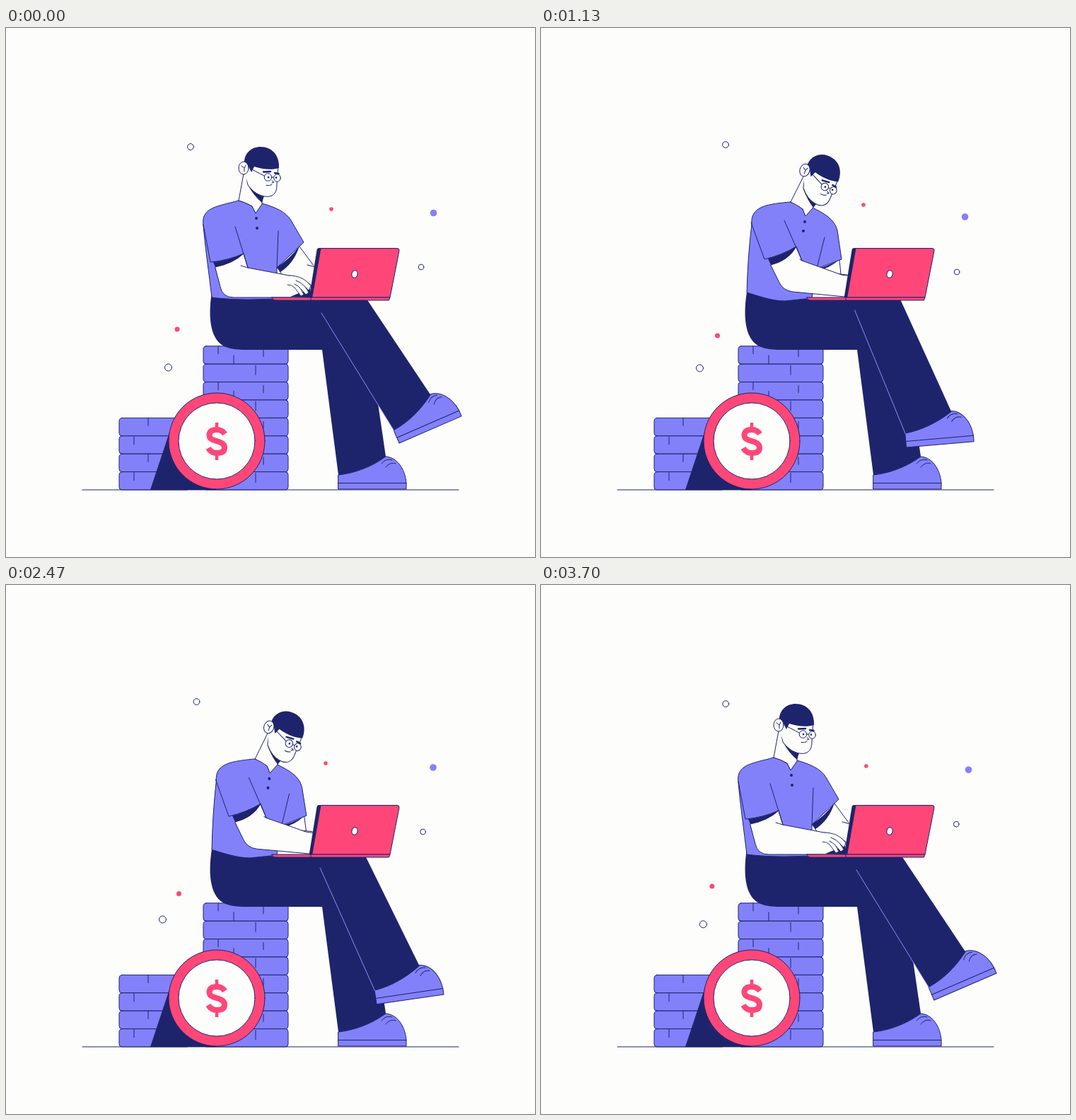
Recreate the animation shown at these times as an HTML page. Size 748 by 748 pixels, loop 3730 ms.

```html
<!DOCTYPE html>
<html lang="en">
<head>
<meta charset="utf-8">
<title>Working on a stack of coins</title>
<style>
  :root { --navy: #1e246c; --blue: #8281fa; --pink: #fe4778; --paper: #fdfdfc; }
  html, body { margin: 0; width: 100%; height: 100%; overflow: hidden; background: var(--paper); }
  svg { display: block; width: 100vw; height: 100vh; }
  svg * { stroke-linejoin: round; stroke-linecap: round; }
  .line { fill: none; stroke: var(--navy); }
  .navy { fill: var(--navy); }
  .blue { fill: var(--blue); stroke: var(--navy); }
  .pink { fill: var(--pink); stroke: var(--navy); }
  .paper { fill: var(--paper); stroke: var(--navy); }
  .skin { fill: var(--paper); }
  .sign { fill: none; stroke: var(--pink); stroke-linecap: butt; }
</style>
</head>
<body>
<svg viewBox="0 0 748 748">
  <defs>
    <g id="shoe">
      <path class="blue" d="M0 0H96V-9C94 -30 82 -45 67 -46C45 -30 20 -22 0 -20Z"/>
      <path class="line" d="M0 -8.5H96M61 -36C65 -41 70 -43 76 -41M67 -31C71 -36 76 -38 81 -36"/>
    </g>
  </defs>

  <path class="line" d="M108 653H640"/>
  <g id="stacks"></g>
  <path class="navy" d="M233 566L204 653H298L290 570Z"/>
  <circle class="pink" cx="298" cy="584" r="68"/>
  <circle class="paper" cx="298" cy="584" r="54"/>
  <path class="sign" stroke-width="8"
    d="M309.500 574C306.500 569.500 303 568 298 568C291 568 287.500 571 287.500 575.500C287.500 581 292 582.500 298 584.200C305 586 309 588.500 309 593.500C309 599 304.500 601 298 601C292.500 601 289 599 286 594"/>
  <path class="sign" stroke-width="4.5" d="M298 558V567M298 602V611"/>

  <use href="#shoe" x="470" y="652"/>
  <path class="navy" d="M291 373C287 400 287 425 298 441C308 455 326 455 345 455H447L470 632C490 630 515 622 537 606L526 531L518 480L472 384H383Z"/>
  <g id="foot"><use href="#shoe" transform="translate(556 587) rotate(-23.4)"/></g>
  <path id="leg" class="navy"/>
  <path id="seam" fill="none" stroke="#8e8df5"/>

  <!-- upper body: d is upright, data-to is leaning in -->
  <path class="blue"
    d="M329 244C315 248 297 251 288 257C279 263 278 270 279 280C282 313 287 347 291 381C305 383 330 384 345 384L383 383L383 339L421 303L403 272C396 260 380 253 362 248L353 262L348 252Q338 246 329 244Z"
    data-to="M353 246C340 247 322 249 313 253C301 258 297 266 298 277C294 310 292 340 291 374C305 378 325 386 345 386L383 382L388 341L425 327L419 286C415 270 400 262 384 254L374 266L370 256Q362 248 353 246Z"/>
  <path class="skin" d="M336 203L329 244Q340 247 348 252L353 262L362 249L364 232Z"
    data-to="M372 208L353 246Q362 250 370 256L374 266L384 255L391 240Z"/>
  <path class="line" d="M336 206L329 244Q340 247 348 252L353 262L362 249L362 238"
    data-to="M371 210L353 246Q362 250 370 256L374 266L384 255L387 248"/>
  <path class="navy" d="M342 222Q352 234 365 237L362 247Q350 237 342 222Z"
    data-to="M370 226Q378 242 390 248L385 254Q377 244 370 226Z"/>
  <path class="line" stroke-width="4" d="M354 269L354 269.1M355 283L355 283.1"
    data-to="M373 274L373 274.1M371 287L371 287.1"/>

  <path class="line" d="M385 287L383 340M415 309L435 336M384 339L391 350M426 335L437 338"
    data-to="M401 296L390 340M422 328L424 348M388 341L391 343M412 347L433 349"/>
  <path class="navy" d="M415 308Q402 326 383 338L388 345Q407 333 415 308Z"
    data-to="M421 328Q405 337 388 341L392 342Q408 340 421 328Z"/>

  <path class="paper"
    d="M296 338Q321 333 336 319L342 339L400 350C412 351 420 354 432 364L432 381L322 381Q306 381 303 366Z"
    data-to="M325 335Q350 329 361 309L369 329L425 349C430 350 434 350 440 351L440 381L356 373Q342 371 337 360Z"/>
  <path class="navy" d="M293 331Q313 329 336 319Q321 333 296 338Z"
    data-to="M321 326Q341 321 361 309Q350 329 325 335Z"/>
  <path class="line" d="M279 278L289 331Q313 329 336 319M324 281L342 339M332 336L342 339"
    data-to="M297 275L316 327Q341 321 361 309M344 272L369 329M366 327L369 329"/>
  <g id="hand">
    <path class="navy" d="M402 380L414 375L430 369V381Z"/>
    <path class="paper" stroke-width=".9" d="M400 350C414 350 424 355 431 365L428 371L423 366L428 374L424 377L417 369L421 377L417 379L408 367Q404 363 398 363"/>
    <path class="line" d="M410 357Q418 360 423 366M408 362Q413 364 417 369"/>
  </g>

  <path class="pink" d="M446 311.500H553Q556.500 311.500 556 315L543 381H431L442 314Q443 311.500 446 311.500Z"/>
  <path class="navy" d="M443 311Q440 311 439.500 314L428.500 382H433L445.500 311.500Z"/>
  <path class="pink" d="M376 381H543L541.500 385H382Q377 385 376 381Z"/>
  <path class="line" d="M431 381V385"/>
  <ellipse class="paper" cx="493" cy="348" rx="4" ry="5.3" transform="rotate(12 493 348)"/>

  <g id="head">
    <path class="paper" d="M343 195L340 212L342 222C348 230 355 236 365 238C377 240 383 234 383 222L385 192Z"/>
    <path class="skin" d="M336 197H347L343 221L337 207Z"/>
    <path class="navy" d="M337 190C337 177 347 168 360 168C376 168 387 180 386 198C376 201 363 200 351 196L347 204L343 196Z"/>
    <ellipse class="paper" cx="336" cy="198" rx="7" ry="9"/>
    <path class="line" d="M333 195L337 198L339 194M337 198V203"/>
    <path class="line" d="M346 199L365 209M375.500 211H378M376 216L379 218L376 219M368 222.500Q373 223.500 376 221.500"/>
    <circle class="paper" cx="370.5" cy="211" r="5.3"/>
    <ellipse class="paper" cx="383.5" cy="212" rx="4.8" ry="5.3"/>
    <path class="line" stroke-width="2.4" d="M364 203.500L374 203M380 205L385.500 206"/>
    <path class="line" stroke-width="2.6" d="M371 211V211.100M382 211.500V211.600"/>
  </g>
  <g id="dots"></g>
</svg>

<script>
const LOOP = 3730;
const $ = id => document.getElementById(id);
const lerp = (a, b, p) => a + (b - a) * p;
const ease = (t, from, to) => {
  const u = Math.min(1, Math.max(0, (t - from) / (to - from)));
  return u * u * (3 - 2 * u);
};

function add(parent, tag, attrs) {
  const el = document.createElementNS('http://www.w3.org/2000/svg', tag);
  for (const k in attrs) el.setAttribute(k, attrs[k]);
  return parent.appendChild(el);
}

// coin stacks
const ROW = 25.4;
function stack(x, w, rows, notches) {
  for (let i = 0; i < rows; i++) {
    const y = 653 - (rows - i) * ROW;
    add($('stacks'), 'rect', { class: 'blue', x, y, width: w, height: ROW, rx: 4 });
    const d = notches[i % 2].map(([nx, from, to]) => `M${nx} ${y + from}V${y + to}`).join('');
    add($('stacks'), 'path', { class: 'line', d });
  }
}
stack(160, 100, 4, [[[201, 0, 11]], [[181, 1, 12]]]);
stack(279, 120, 8, [[[300, 0, 11], [322, 13, 25], [364, 5, 15]], [[353, 2, 15]]]);

// drifting dots: radius, fill, then x,y at each time stop
const STOPS = [0, 370, 1130, 1930, 2470, 2930];
const dots = [
  [4.4, '', 261, 168, 258, 167, 261, 165, 266, 164, 269.5, 165, 270, 168],
  [2.8, '#fe4b68', 460, 256, 461, 255, 456, 250, 449.5, 247, 452, 252, 455, 256],
  [4.8, '#8281fa', 604.5, 261.5, 604, 265.5, 599.5, 267, 603, 264, 604, 258, 604, 255],
  [3.8, '', 587, 338, 587.5, 339.5, 588, 345, 586.5, 347.5, 589.5, 349, 592, 347],
  [3.5, '#fe4778', 242, 426, 246.5, 429, 249.5, 435, 248.5, 436, 244.5, 436.5, 240.5, 433],
  [5, '', 229.5, 480, 227.5, 481.5, 224.5, 481, 221.5, 478, 221.5, 473, 225, 472]
].map(([r, fill, ...pts]) => ({
  pts,
  el: add($('dots'), 'circle', fill ? { r, fill } : { r, class: 'paper' })
}));

// smooth closed curve through the stops
function drift(pts, axis, t) {
  const n = STOPS.length;
  const wrap = i => (i + n) % n;
  const time = i => STOPS[wrap(i)] + Math.floor(i / n) * LOOP;
  const val = i => pts[wrap(i) * 2 + axis];
  const slope = i => (val(i + 1) - val(i - 1)) / (time(i + 1) - time(i - 1));
  let i = n - 1;
  while (STOPS[i] > t) i--;
  const h = time(i + 1) - time(i), u = (t - time(i)) / h, v = 1 - u;
  return v * v * (1 + 2 * u) * val(i) + u * u * (3 - 2 * u) * val(i + 1)
    + h * u * v * (v * slope(i) - u * slope(i + 1));
}

// paths that blend between two poses
const NUM = /-?\d+(\.\d+)?/g;
const morphs = [...document.querySelectorAll('[data-to]')].map(el => ({
  el, from: el.getAttribute('d'), to: el.dataset.to.match(NUM).map(Number)
}));

const HIP = { x: 518, y: 469 };
function turn(x, y, deg) {
  const a = deg * Math.PI / 180, c = Math.cos(a), s = Math.sin(a);
  const dx = x - HIP.x, dy = y - HIP.y;
  return `${HIP.x + dx * c - dy * s} ${HIP.y + dx * s + dy * c}`;
}

function drawLeg(t) {
  const q = ease(t, 0, 1000) - ease(t, 1000, 1850) + ease(t, 1850, 2760) - ease(t, 2760, LOOP);
  const deg = 19.8 * q;
  const top = `${lerp(446, 443.5, q)} ${lerp(403, 399, q)}`;
  const heel = turn(548.5, 569, deg);
  const hem = [[600.5, 519], [585, 543], [566, 558]].map(([x, y]) => turn(x, y, deg));
  $('foot').setAttribute('transform', `rotate(${deg} ${HIP.x} ${HIP.y})`);
  $('leg').setAttribute('d',
    `M${top}L430 384H${lerp(510.5, 508, q)}L${hem[0]}C${hem[1]} ${hem[2]} ${heel}Z`);
  $('seam').setAttribute('d', `M${top}L${heel}`);
}

function drawBody(t) {
  const p = ease(t, 45, 607) - ease(t, 2408, 2969);
  for (const { el, from, to } of morphs) {
    let i = 0;
    el.setAttribute('d', from.replace(NUM, n => lerp(+n, to[i++], p).toFixed(2)));
  }
  $('head').setAttribute('transform', `translate(${37 * p} ${3 * p}) rotate(${19 * p} 336 198)`);
  $('hand').setAttribute('transform', `translate(${36 * p} 0)`);
}

function draw(t) {
  drawLeg(t);
  drawBody(t);
  for (const { el, pts } of dots) {
    el.setAttribute('cx', drift(pts, 0, t));
    el.setAttribute('cy', drift(pts, 1, t));
  }
}

const start = performance.now();
function tick() {
  draw((performance.now() - start) % LOOP);
  requestAnimationFrame(tick);
}
tick();
</script>
</body>
</html>
```
